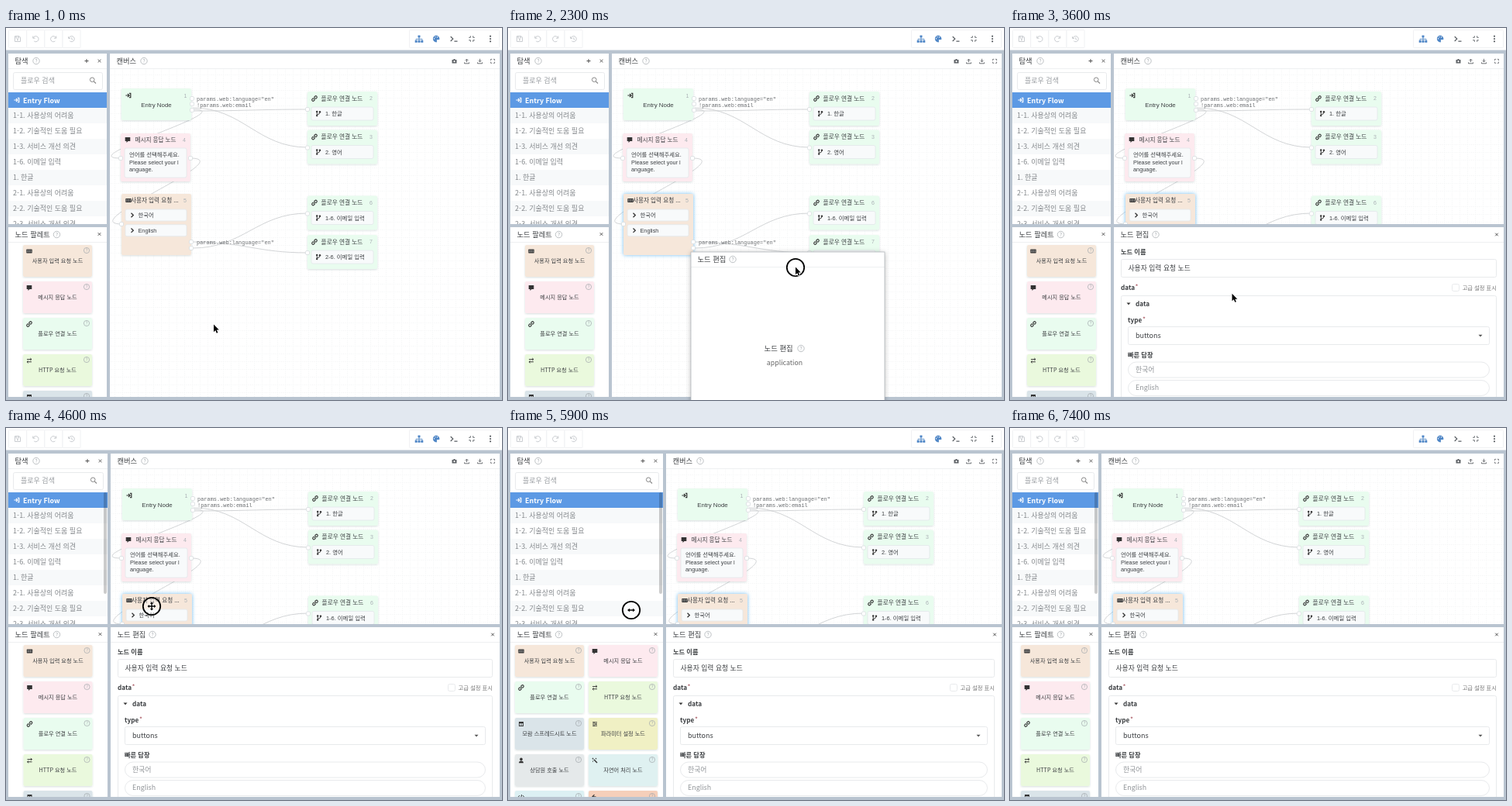
An HTML page that plays this animation: 640 by 480 pixels, repeating every 7.5 s.

```html
<!DOCTYPE html>
<html lang="ko">
<head>
<meta charset="utf-8">
<title>Flow editor</title>
<style>
html, body { margin: 0; width: 100%; height: 100%; overflow: hidden; background: #b9c4d0; }
svg { display: block; overflow: hidden; }
text { font-family: 'Noto Sans CJK KR', 'Noto Sans CJK', sans-serif; fill: #3c3f42; white-space: pre; }
.h { font-family: 'Liberation Sans', 'Noto Sans CJK KR', 'Noto Sans CJK', sans-serif; }
.m { font-family: 'Liberation Mono', monospace; }
.b { font-weight: 500; }
.bb { font-weight: 700; }
</style>
</head>
<body>
<svg id="stage" width="640" height="480" viewBox="0 0 640 480"></svg>
<script>
const LOOP = 7500;
const stage = document.getElementById('stage');

// Drawing helpers
const text = (x, y, s, size = 9, attrs = '') =>
  `<text x="${x}" y="${y}" font-size="${size}" ${attrs}>${s}</text>`;
const rect = (x, y, w, h, fill = '#fff', attrs = '') =>
  `<rect x="${x}" y="${y}" width="${w}" height="${h}" fill="${fill}" ${attrs}/>`;
const circle = (x, y, r, fill = 'none', attrs = '') =>
  `<circle cx="${x}" cy="${y}" r="${r}" fill="${fill}" ${attrs}/>`;
const line = (d, color = '#333', width = 1, attrs = '') =>
  `<path d="${d}" fill="none" stroke="${color}" stroke-width="${width}" ${attrs}/>`;
const solid = (d, color = '#333') => `<path d="${d}" fill="${color}"/>`;
const at = (x, y, body) => `<g transform="translate(${x} ${y})">${body}</g>`;
const field = (x, y, w, h, r = 2, color = '#e8eaec') =>
  rect(x + .5, y + .5, w - 1, h - 1, '#fff', `rx="${r}" stroke="${color}"`);
const help = (x, y, r = 4.2, color = '#a3a8ad') =>
  circle(x, y, r, 'none', `stroke="${color}" stroke-width=".7"`) +
  text(x, y + r * .55, '?', r * 1.6, `text-anchor="middle" style="fill:${color}"`);

const icons = {
  enter: c => line('M-3.6 0H1M-1-2.1L1.1 0L-1 2.1M1-2.7H2.8V2.7H1', c, 1.2),
  link: c => `<g transform="rotate(-45)">${
    line('M-.5-1.5H-2.5a1.5 1.5 0 0 0 0 3H-.5M.5-1.5H2.5a1.5 1.5 0 0 1 0 3H.5M-1.6 0H1.6', c, 1.1)}</g>`,
  chat: c => solid('M-3.3-3H3.3V2H.5L-1.5 4V2H-3.3z', c),
  keys: c => rect(-3.7, -2.4, 7.4, 4.8, c, 'rx=".6"') + line('M-2.8-.9H2.8M-2.8 .7H2.8', '#eee', .7, 'stroke-dasharray="1 .6"'),
  swap: c => line('M-3-1.5H3M1.3-3L3-1.5L1.3 0M3 1.8H-3M-1.3 .3L-3 1.8L-1.3 3.3', c, .9),
  sheet: c => rect(-3, -3, 6, 6, c) + rect(-2.1, -.9, 1.7, 3, '#dbe5ea') + rect(.4, -.9, 1.7, 3, '#dbe5ea'),
  sliders: c => line('M-3-2.2H3M-3 0H3M-3 2.2H3M-1-3V-1.2M1.5-.9V.9M-1 1.3V3.1', c, .9),
  person: c => solid('M-3 3.3Q-3 .4 0 .4T3 3.3z', c) + circle(0, -1.6, 1.8, c),
  wand: c => line('M3 3L-1.2-1.2', c, 1.5) + line('M-2.5-3.4V-1.4M-3.5-2.4H-1.5M1.5-3.2V-1.6M.7-2.4H2.3M-2.5 .4V2', c, .7),
  code: c => line('M-1.8-2L-3.8 0L-1.8 2M1.8-2L3.8 0L1.8 2M.7-3L-.7 3', c, .9),
  back: c => line('M3 2.5Q3-.5-2.5-.5M-.5-2.8L-3-.5L-.5 1.8', c, 1.1),
  branch: c => line('M-1.8-2.3V2.3M-1.8 1.2Q2 1 2-1.5', c, .9) +
    [[-1.8, -2.6], [-1.8, 2.6], [2, -2.2]].map(([x, y]) => circle(x, y, 1.2, c)).join(''),
  chevron: c => line('M-1.5-2.7L1.3 0L-1.5 2.7', c, 1.3),
  close: c => line('M-1.8-1.8L1.8 1.8M1.8-1.8L-1.8 1.8', c, 1),
  plus: c => line('M-2.5 0H2.5M0-2.5V2.5', c, 1),
  search: c => circle(-.8, -.8, 2.8, 'none', `stroke="${c}"`) + line('M1.3 1.3L4 4', c, 1.2),
  camera: c => solid('M-3-1.8H-1.3L-.7-2.8H.7L1.3-1.8H3V2.6H-3z', c) + circle(0, .3, 1.1, '#fff'),
  up: c => line('M0 1.2V-2.5M-2-.7L0-2.7L2-.7M-3 1.5V3H3V1.5', c, .9),
  down: c => line('M0-3V.8M-2-1L0 1L2-1M-3 1.5V3H3V1.5', c, .9),
  expand: c => line('M-2.5-.8V-2.5H-.8M.8-2.5H2.5V-.8M2.5 .8V2.5H.8M-.8 2.5H-2.5V.8', c, .8),
  compress: c => line('M-3.8-1.7H-1.7V-3.8M1.7-3.8V-1.7H3.8M3.8 1.7H1.7V3.8M-1.7 3.8V1.7H-3.8', c, .9),
  save: c => line('M-3.5-3.5H2L3.5-2V3.5H-3.5zM-2-3.3V-1H1.5V-3.3', c, .9) + circle(0, 1.3, 1, c),
  undo: c => line('M-3.4-3.6V-.8H-.6M-3.2-1A3.6 3.6 0 1 1-2 3', c, .9),
  redo: c => line('M3.4-3.6V-.8H.6M3.2-1A3.6 3.6 0 1 0 2 3', c, .9),
  history: c => line('M-3.4-.8A3.6 3.6 0 1 1-2.3 2.8M-4-3V-.6H-1.6M.2-1.8V.4L1.8 1.2', c, .9),
  tree: c => line('M0-2V3M-4 3V.3H4V3', c, .9) + [[-1.5, -4.5], [-5.3, 2], [-1.5, 2], [2.3, 2]].map(([x, y]) => rect(x, y, 3, 2.8, c)).join(''),
  palette: c => solid('M0-4.4A4.4 4.4 0 1 0 .6 4.4Q1.5 3 .8 2T2.4 1H4.3A4.4 4.4 0 0 0 0-4.4z', c) +
    [[-2.4, -.3], [-1, -2.4], [1.6, -2.2]].map(([x, y]) => circle(x, y, .7, '#fff')).join(''),
  terminal: c => line('M-4.3-3L-1.2 0L-4.3 3M.4 3.2H4.5', c, 1.2),
  more: c => [-3.3, 0, 3.3].map(y => circle(0, y, 1.1, c)).join(''),
  caret: c => solid('M-2.5-1.3H2.5L0 1.5z', c),
  type: c => text(-4.5, 3, 'Tт', 8.5, `class="bb" style="fill:${c}"`),
  clip: c => line('M-3 1.6H2a1.8 1.8 0 0 0 0-3.6H-2.3a1.2 1.2 0 0 0 0 2.5H1.5', c, 1),
  slides: c => rect(-2.3, -3.3, 4.6, 6.6, c) + rect(-4.4, -2.3, 1.4, 4.6, c) + rect(3, -2.3, 1.4, 4.6, c),
  pin: c => solid('M0 4.6Q-3 .5-3-1.3A3 3 0 0 1 3-1.3Q3 .5 0 4.6z', c) + circle(0, -1.2, 1.1, '#fff')
};
const icon = (name, x, y, color = '#333') => at(x, y, icons[name](color));

// Motion helpers
const ease = u => u * u * (3 - 2 * u);
function track(t, keys) {
  if (t <= keys[0][0]) return keys[0].slice(1);
  for (let i = 1; i < keys.length; i++) {
    const [a, b] = [keys[i - 1], keys[i]];
    if (t <= b[0]) {
      const u = ease((t - a[0]) / (b[0] - a[0]));
      return a.slice(1).map((v, k) => v + (b[k + 1] - v) * u);
    }
  }
  return keys[keys.length - 1].slice(1);
}
const within = (t, a, b) => t >= a && t < b;

const CURSOR = [[200, 268, 383], [700, 204, 290], [1250, 204, 290], [1700, 522, 43], [1850, 522, 43],
  [2300, 371, 309], [2900, 371, 405], [3200, 371, 405], [4200, 132, 230], [4450, 132, 230],
  [4600, 188, 230], [5000, 208, 232], [5500, 206, 234], [5900, 159, 235], [6400, 117, 235]];
const SPLIT = [[4500, 132], [4600, 133], [5250, 202], [5900, 202], [6600, 116]];
const FLOAT = [[2000, 387, 53], [2300, 236, 289], [2600, 235, 380], [2900, 235, 399]];

// A clipped panel whose contents use coordinates starting at (ox, oy)
function panel(x, y, w, h, ox, oy, title, helpX, body) {
  return `<svg x="${x}" y="${y}" width="${w}" height="${h}" viewBox="${ox} ${oy} ${w} ${h}">` +
    rect(ox, oy, w, h) + body + rect(ox, oy, w, 19.5) +
    line(`M${ox} ${oy + 19.5}H${ox + w}`, '#eef0f1') +
    text(ox + 8.5, oy + 12.8, title, 9.3, 'class="b"') + help(ox + helpX, oy + 9.5);
}

function toolbar() {
  let out = rect(0, 0, 640, 28.5);
  ['save', 'undo', 'redo', 'history'].forEach((name, i) => {
    out += field(3 + 23.2 * i, 2, 24, 24, 1, '#f0f1f3') + icon(name, 15 + 23.2 * i, 14, '#c3c7cb');
  });
  out += field(520, 2, 117, 24, 1, '#f0f1f3');
  [['tree', 533], ['palette', 555], ['terminal', 578], ['compress', 601], ['more', 625]].forEach(([name, x], i) => {
    out += icon(name, x, 14, i < 2 ? '#4f86c6' : '#5a5f64');
  });
  return out;
}

const FLOWS = ['1-1. 사용상의 어려움', '1-2. 기술적인 도움 필요', '1-3. 서비스 개선 의견', '1-6. 이메일 입력',
  '1. 한글', '2-1. 사용상의 어려움', '2-2. 기술적인 도움 필요', '2-3. 서비스 개선 의견'];

function explorer(right, scrollbar) {
  let body = field(9, 57, right - 14, 23) + text(19, 71, '플로우 검색', 9, 'style="fill:#999da1"') +
    icon('search', right - 18, 67.5, '#888');
  FLOWS.forEach((name, i) => {
    const y = 103 + 20 * i;
    body += rect(3, y, right, 20, i % 2 ? '#fff' : '#f7f9fa') + text(9, y + 13.4, name, 9, 'style="fill:#84888c"');
  });
  body += rect(3, 83, right, 20, '#5c99e4') + icon('enter', 14, 93, '#fff') +
    text(22, 96.6, 'Entry Flow', 8.9, 'class="bb" style="fill:#fff"');
  if (scrollbar) body += rect(right - 5, 83, 4, 131, '#000', 'rx="2" fill-opacity=".2"');
  return panel(3, 33, right - 3, 220, 3, 33, '탐색', 36, body) +
    icon('plus', right - 26, 42.5, '#555') + icon('close', right - 9.5, 42.5, '#555') + '</svg>';
}

const KINDS = [['사용자 입력 요청', '#f6e7da', 'keys'], ['메시지 응답', '#fdeaef', 'chat'],
  ['플로우 연결', '#e9fcef', 'link'], ['HTTP 요청', '#eaf9dd', 'swap'],
  ['모람 스프레드시트', '#dae4e9', 'sheet'], ['파라미터 설정', '#f0f0c4', 'sliders'],
  ['상담원 호출', '#e5e9ea', 'person'], ['자연어 처리', '#dff1f1', 'wand'],
  ['코드 실행', '#dcf0f3', 'code'], ['이전 이동', '#f5cfba', 'back']];

const card = (x, y, w, h, fill, effect = 'shade') =>
  rect(x, y, w, h, fill, `rx="2" filter="url(#${effect})"`);

function palette(right) {
  const wide = right >= 198;
  const left = wide ? 9 : (right + 3) / 2 - 44.5;
  const body = KINDS.map(([name, fill, glyph], i) => {
    const x = left + (wide ? i % 2 * 95 : 0);
    const y = 280 + 47 * (wide ? i >> 1 : i);
    return card(x, y, 89, 41, fill) + icon(glyph, x + 8, y + 8) + help(x + 82, y + 7, 3.6) +
      text(x + 44.5, y + 23, name + ' 노드', 7.2, 'text-anchor="middle"');
  }).join('');
  return panel(3, 257, right - 3, 219, 3, 257, '노드 팔레트', 62.5, body) +
    icon('close', right - 9.5, 266, '#555') + '</svg>';
}

const port = (x, y) => rect(x - 2.5, y - 2.5, 5, 5, '#fff', 'rx="1.5" stroke="#d9dde0" stroke-width=".8"');
const wire = (x1, y1, x2, y2, reach = 65) =>
  line(`M${x1} ${y1}C${x1 + reach} ${y1} ${x2 - reach} ${y2} ${x2} ${y2}`, '#cdd0d2', .9);
const slot = (x, y, w, h) => rect(x, y, w, h, '#f8fafb', 'rx="2" stroke="#e3e8ea" stroke-width=".8"');
const number = (x, y, n) => text(x, y, n, 7, 'class="h" text-anchor="middle" style="fill:#a9afb4"');

function linkNode(y, n, label) {
  return card(389, y, 90, 44, '#e9fcef') + icon('link', 398, y + 9) +
    text(433.5, y + 11.5, '플로우 연결 노드', 7.7, 'text-anchor="middle"') + number(471, y + 11, n) +
    slot(394, y + 20, 80, 17) + icon('branch', 403, y + 28.5) + text(412, y + 31.2, label, 7.4, 'class="h"') +
    port(389, y + 23);
}

function canvas(left, right, height, selected, arrow) {
  const w = right - left, edge = 134 + w;
  let body = rect(134, 53, w, 440, 'url(#grid)');
  body += wire(241, 103, 389, 154) + wire(241, 107, 389, 105) + wire(241, 105, 148, 168) +
    wire(238, 168, 150, 253) + wire(241, 284, 389, 239) + wire(241, 276, 389, 290);
  const mono = (y, s) => text(246, y, s, 6.95, 'class="m" style="fill:#6c6f72"');
  body += mono(93.5, 'params.web:language="en"') + mono(101.5, '!params.web:email') + mono(278.5, 'params.web:language="en"');

  body += card(149, 78, 90, 41, '#e9fcef') + icon('enter', 158, 87) + number(231.5, 89.5, 1) +
    text(194, 102.3, 'Entry Node', 7.9, 'class="h" text-anchor="middle"') + [91, 98, 106].map(y => port(240, y)).join('');

  body += card(148, 136, 90, 62, '#fdeaef') + icon('chat', 157, 144) + number(230, 147, 4) +
    text(193, 147, '메시지 응답 노드', 7.6, 'text-anchor="middle"') + slot(153, 155, 80, 38) +
    ['언어를 선택해주세요.', 'Please select your l', 'anguage.'].map((s, i) =>
      text(159, 166 + 9.7 * i, s, 7.35, 'class="h"')).join('') + port(148, 168) + port(238, 168);

  body += card(149, 214, 90, 79, '#f6e7da', selected ? 'glow' : 'shade') + icon('keys', 158, 222.5) +
    text(161, 225, '사용자 입력 요청 ...', 7.6) + number(231, 225, 5);
  ['한국어', 'English'].forEach((s, i) => {
    const y = 234 + 19.7 * i;
    body += slot(154, y, 79, 15) + icon('chevron', 163, y + 7.5) + text(170.5, y + 10.2, s, 7.3, 'class="h"');
  });
  body += port(149, 253) + port(239, 276) + port(239, 284);

  body += linkNode(82, 2, '1. 한글') + linkNode(131.5, 3, '2. 영어') +
    linkNode(216.5, 6, '1-6. 이메일 입력') + linkNode(267, 7, '2-6. 이메일 입력');
  if (arrow) body += solid('M246 245.5L259.5 253L246 260.5z', '#b5daf3');

  return panel(left, 33, w, height, 134, 33, '캔버스', 44, body) +
    [['camera', 58.5], ['up', 42.5], ['down', 25.5], ['expand', 9]].map(([name, d]) =>
      icon(name, edge - d, 42.8, '#5f6367')).join('') + '</svg>';
}

function editor(x, y, h) {
  const R = 387 + 637 - x;
  const label = (lx, ly, s) => text(lx, ly, s, 8.2, 'class="bb"');
  const star = (sx, sy) => text(sx, sy, '*', 8.5, 'style="fill:#a5525c"');
  const fold = (fx, fy, s) => icon('caret', fx, fy - 3, '#333') + label(fx + 9, fy, s);
  const pill = (py, s) => field(405, py, R - 423, 21, 10.5) + text(415, py + 13.4, s, 8.9, 'style="fill:#909498"');
  const body = label(396, 68.2, '노드 이름') + field(396, 74, R - 405, 24) + text(405.5, 88.8, '사용자 입력 요청 노드', 8.8) +
    label(396, 114, 'data') + star(414.5, 113) +
    field(R - 67, 106, 10, 10) + text(R - 9, 114, '고급 설정 표시', 7.3, 'text-anchor="end" style="fill:#777"') +
    field(396, 121, R - 405, 500) + fold(406, 134.7, 'data') +
    label(405, 156.3, 'type') + star(424, 155.3) + field(405, 161, R - 423, 24) +
    text(415, 176, 'buttons', 9) + icon('caret', R - 30, 173, '#555') +
    label(405, 201.3, '빠른 답장') + pill(206.5, '한국어') + pill(230, 'English') +
    text((405 + R - 18) / 2, 267.5, '+빠른 답장 추가', 8.8, 'text-anchor="middle" style="fill:#95999d"') +
    label(405, 293, 'messages') + field(405, 297, R - 423, 400) + fold(415.5, 313.3, 'data.messages') +
    label(415, 334.3, 'failure') + field(415, 339, R - 442, 400) + fold(424.5, 355, 'data.messages.failure') +
    rect(424, 368, 21.5, 22, '#dcdde0', 'rx="2"') + icon('type', 435, 379, '#555') +
    icon('clip', 457.5, 379, '#888') + icon('slides', 480.5, 379, '#888') + icon('pin', 503, 379, '#888') +
    field(424, 392, R - 461, 71) + text(433, 408, '잘못된 값을 입력하셨습니다.', 8.85) +
    line(`M${R - 44} 461L${R - 39} 456M${R - 41.5} 461L${R - 39} 458.5`, '#999', .8);
  return panel(x, y, 637 - x, h, 387, 33, '노드 편집', 54, body) + icon('close', R - 9, 42.5, '#555') + '</svg>';
}

function floating(x, y) {
  const body = text(94.5, 128, '노드 편집', 9.4, 'class="b"') + help(142, 124.5) +
    text(121, 146, 'application', 8.8, 'text-anchor="middle" style="fill:#666"');
  return rect(x, y, 250, 300, '#fff', 'filter="url(#lift)"') +
    panel(x, y, 250, 300, 0, 0, '노드 편집', 54, body) + '</svg>' +
    rect(x, y, 250, 300, 'none', 'stroke="#b4b9be" stroke-width=".8"');
}

function pointer(t) {
  if (t >= 7000) return '';
  const [x, y] = track(t, CURSOR);
  const pressed = within(t, 750, 900) || within(t, 1750, 2800) || within(t, 4400, 6500);
  let shape;
  if (within(t, 650, 1350) || within(t, 4530, 4850)) {
    const d = 'M-4 0H4M0-4V4';
    shape = line(d, '#fff', 3) + line(d, '#000', 1.4) +
      solid('M0-5.5L2-3H-2zM0 5.5L2 3H-2zM-5.5 0L-3-2V2zM5.5 0L3-2V2z', '#000');
  } else if (t >= 4150) {
    shape = line('M-3 0H3', '#000', 1.5) + solid('M-5 0L-2-2.3V2.3zM5 0L2-2.3V2.3z', '#000');
  } else {
    shape = '<path d="M0-.5V9.2L2.2 7.1L3.8 10.7L5.4 10L3.8 6.5H6.8z" paint-order="stroke" stroke="#fff" stroke-width="1.4"/>';
  }
  const ring = pressed ? circle(0, 0, 11.2, '#fff', 'fill-opacity=".35" stroke="#000" stroke-width="1.8"') : '';
  return at(x.toFixed(2), y.toFixed(2), ring + shape);
}

const DEFS = `<defs>
  <pattern id="grid" width="10" height="10" patternUnits="userSpaceOnUse"><path d="M0 .5H10M.5 0V10" stroke="#f0f1f2" stroke-width=".8" stroke-dasharray="1 1.5"/></pattern>
  <filter id="shade" x="-10%" y="-10%" width="120%" height="130%"><feDropShadow dx="0" dy="1" stdDeviation=".8" flood-color="#344" flood-opacity=".18"/></filter>
  <filter id="glow" x="-20%" y="-20%" width="140%" height="140%"><feDropShadow dx="0" dy="0" stdDeviation="2.8" flood-color="#55b2f0" flood-opacity=".85"/></filter>
  <filter id="lift" x="-10%" y="-10%" width="120%" height="120%"><feDropShadow dx="0" dy="1" stdDeviation="3" flood-color="#000" flood-opacity=".3"/></filter>
</defs>`;

function scene(t) {
  const split = track(t, SPLIT)[0];
  const docked = within(t, 1000, 2000), below = t >= 3000;
  let out = DEFS + rect(0, 0, 640, 480, '#b9c4d0') + toolbar() +
    explorer(split - 2, t >= 4500) + palette(split - 2) +
    canvas(split + 2, docked ? 383.5 : 637, below ? 220 : 443, t >= 800, within(t, 900, 1400));
  if (docked) out += editor(387, 33, 443);
  if (below) out += editor(split + 2, 257, 219);
  if (within(t, 2600, 3000)) {
    out += rect(134.5, 255.5, 502, 220, '#a9d5f2', 'fill-opacity=".36" stroke="#5aa9d8" stroke-width="1.5"');
  }
  if (within(t, 2000, 3000)) out += floating(...track(t, FLOAT));
  return out + pointer(t);
}

let shown = '';
function render(now) {
  const markup = scene(now % LOOP);
  if (markup !== shown) stage.innerHTML = shown = markup;
}
const start = performance.now();
function frame() {
  render(performance.now() - start);
  requestAnimationFrame(frame);
}
frame();
</script>
</body>
</html>
```
